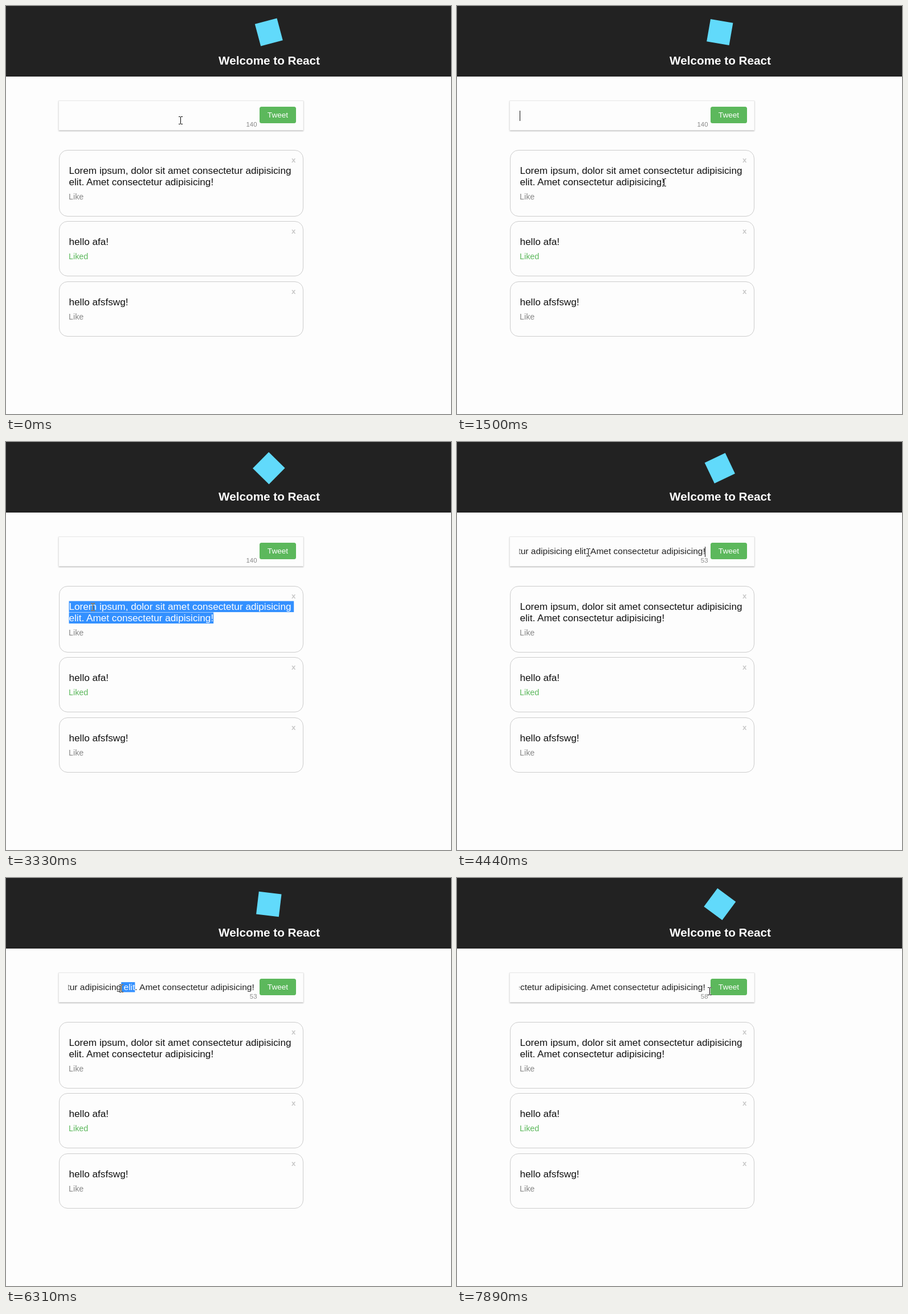
Recreate the animation shown at these times as an HTML page. Size 781x717 px, loop 8 s.

```html
<!DOCTYPE html>
<html lang="en">
<head>
<meta charset="utf-8">
<title>Message board</title>
<style>
  html, body { margin: 0; width: 100%; height: 100%; overflow: hidden; background: #fdfdfd; }
  svg { display: block; font-family: "Liberation Sans", Arial, sans-serif; }
  .title { font-size: 20.7px; font-weight: bold; fill: #fff; text-anchor: middle; }
  .body { font-size: 17.17px; fill: #111; }
  .like { font-size: 14.3px; fill: #888; }
  .liked { fill: #5cb85c; }
  .close { font-size: 13.3px; font-weight: bold; fill: #c8c8c8; text-anchor: middle; }
  .entry { font-size: 15.5px; fill: #222; text-anchor: end; }
  .count { font-size: 11.4px; fill: #888; text-anchor: end; }
  .button { font-size: 13.6px; fill: #fff; text-anchor: middle; }
  .card { fill: none; stroke: #ccc; }
  .mark { fill: #3390ff; }
  .lit text { fill: #fff; }
  .cursor { mix-blend-mode: difference; fill: none; stroke: #fff; shape-rendering: crispEdges; }
  .field { fill: #fdfdfd; filter: drop-shadow(0 1px 1px rgba(0, 0, 0, .34)); }
</style>
</head>
<body>
<svg width="781" height="717" viewBox="0 0 781 717">
  <defs>
    <clipPath id="fieldClip"><rect x="109.5" y="170" width="327" height="45"/></clipPath>
    <clipPath id="selClip"><rect/><rect/><rect/></clipPath>
  </defs>
  <rect width="781" height="717" fill="#fdfdfd"/>
  <rect width="781" height="124" fill="#222"/>
  <rect id="logo" x="-20" y="-20" width="40" height="40" fill="#61dafb"/>
  <text class="title" x="462" y="103">Welcome to React</text>

  <rect class="field" x="92.5" y="166.5" width="429.5" height="52"/>
  <path d="M92.5 219V166.5H522V219" fill="none" stroke="#e9e9e9"/>
  <rect x="445" y="177" width="64" height="29" rx="3.5" fill="#5cb85c"/>
  <text class="button" x="477" y="196">Tweet</text>
  <text class="count" id="count" x="440.5" y="212"></text>

  <g id="cards"></g>
  <g id="plain">
    <text class="body" x="110.5" y="295">Lorem ipsum, dolor sit amet consectetur adipisicing</text>
    <text class="body" x="110.5" y="315">elit. Amet consectetur adipisicing!</text>
    <g clip-path="url(#fieldClip)"><text class="entry" x="435.7" y="197"></text></g>
  </g>
  <g id="marks"><rect class="mark"/><rect class="mark"/><rect class="mark"/></g>
  <g class="lit" clip-path="url(#selClip)" id="lit"></g>
  <rect id="caret" y="184" width="1" height="18" fill="#111"/>
  <path class="cursor" id="cursor" d="M-3 -6.5H0M1 -6.5H4M.5 -6V6M-3 6.5H0M1 6.5H4"/>
</svg>
<script>
const LOOP = 8000, STEP = 138, BLINK = 530, LAG = 50;
const LIMIT = 140, SPIN = .018;
const LINE_BREAK = 293 + 6;
const $ = id => document.getElementById(id);

// Pointer stops: [time, x, y]
const STOPS = [
  [0, 306, 201], [1300, 363, 310], [2250, 366, 316], [2480, 170, 292], [2800, 78, 290],
  [3200, 152, 290], [3600, 152, 290], [4050, 231, 194], [5150, 226, 193],
  [5900, 202, 193], [6500, 202, 194], [7000, 215, 205], [7700, 295, 199], [7850, 443, 199]
];

const DRAGS = [
  { press: 2260, release: 2850, clear: 3940, inField: false },
  { press: 5150, release: 5950, clear: 6850, inField: true }
];

const PASTED = "Lorem ipsum, dolor sit amet consectetur adipisicing elit. Amet consectetur adipisicing!";
const CUT = PASTED.replace(" elit", "");
const EDITS = [
  { at: -740, text: "", caret: 110 },
  { at: 3940, text: "", caret: 110 },
  { at: 4130, text: PASTED, caret: 435 },
  { at: 4900, text: PASTED, caret: 226 },
  { at: 6850, text: CUT, caret: 226 }
];

function pointAt(t) {
  const i = STOPS.findIndex(s => s[0] > t);
  if (i < 0) return STOPS.at(-1).slice(1);
  const [t0, x0, y0] = STOPS[i - 1], [t1, x1, y1] = STOPS[i];
  const k = (t - t0) / (t1 - t0), ease = k * k * (3 - 2 * k);
  return [x0 + (x1 - x0) * ease, y0 + (y1 - y0) * ease];
}

function card(y, h, liked, text = "") {
  return `<rect class="card" x="93.5" y="${y}" width="428" height="${h}" rx="14.5"/>
    <text class="close" x="504.7" y="${y + 21.5}">x</text>
    <text class="body" x="110.5" y="${y + 41.5}">${text}</text>
    <text class="like ${liked ? "liked" : ""}" x="110" y="${y + h - 29.5}">${liked ? "Liked" : "Like"}</text>`;
}
$("cards").innerHTML = card(253.5, 116, false) +
  card(378.5, 96, true, "hello afa!") + card(484.5, 96, false, "hello afsfswg!");

$("lit").innerHTML = $("plain").innerHTML;
const lines = document.querySelectorAll("#plain text");
const entries = document.querySelectorAll(".entry");
const marks = document.querySelectorAll("#marks rect");
const clips = document.querySelectorAll("#selClip rect");

// Nearest gap between letters
function snap(line, x) {
  let best = line.getEndPositionOfChar(line.getNumberOfChars() - 1).x;
  for (let i = 0; i < line.getNumberOfChars(); i++) {
    const edge = line.getStartPositionOfChar(i).x;
    if (Math.abs(edge - x) < Math.abs(best - x)) best = edge;
  }
  return best;
}

// Selected span of each line: [left, right]
function spans(drag, t) {
  const none = [0, 0];
  if (!drag) return [none, none, none];
  const [x, y] = pointAt(Math.min(t - LAG, drag.release));
  const anchor = pointAt(drag.press)[0];
  const span = (line, from, to) => [snap(line, from), snap(line, to)];
  if (drag.inField) return [none, none, span(lines[2], x, anchor)];
  if (y > LINE_BREAK) return [none, span(lines[1], x, anchor), none];
  const [left, right] = span(lines[0], x, Infinity);
  const newline = 4.7;
  return [[left, lines[0].getEndPositionOfChar(lines[0].getNumberOfChars() - 1).x + newline],
    span(lines[1], 0, anchor), none];
}

function mark(i, [left, right]) {
  const size = parseFloat(getComputedStyle(lines[i]).fontSize);
  const box = { x: left, y: lines[i].getAttribute("y") - size * .9, width: right - left, height: size * 1.13 };
  for (const el of [marks[i], clips[i]])
    for (const key in box) el.setAttribute(key, box[key]);
}

function draw(time) {
  const t = Math.floor(time / STEP) * STEP;
  $("logo").setAttribute("transform", `translate(461.3 46) rotate(${t * SPIN - 15})`);
  $("cursor").setAttribute("transform", `translate(${pointAt(t).map(Math.round)})`);

  const edit = EDITS.findLast(e => e.at <= t);
  entries.forEach(el => el.textContent = edit.text);
  $("count").textContent = LIMIT - edit.text.length;

  const drag = DRAGS.find(d => t >= d.press && t < d.clear);
  spans(drag, t).forEach((span, i) => mark(i, span));

  const shown = !drag && Math.floor((t - edit.at) / BLINK) % 2 === 0;
  $("caret").setAttribute("visibility", shown ? "visible" : "hidden");
  $("caret").setAttribute("x", edit.caret);
}

const begin = performance.now();
function frame() {
  draw((performance.now() - begin) % LOOP);
  requestAnimationFrame(frame);
}
frame();
</script>
</body>
</html>
```
